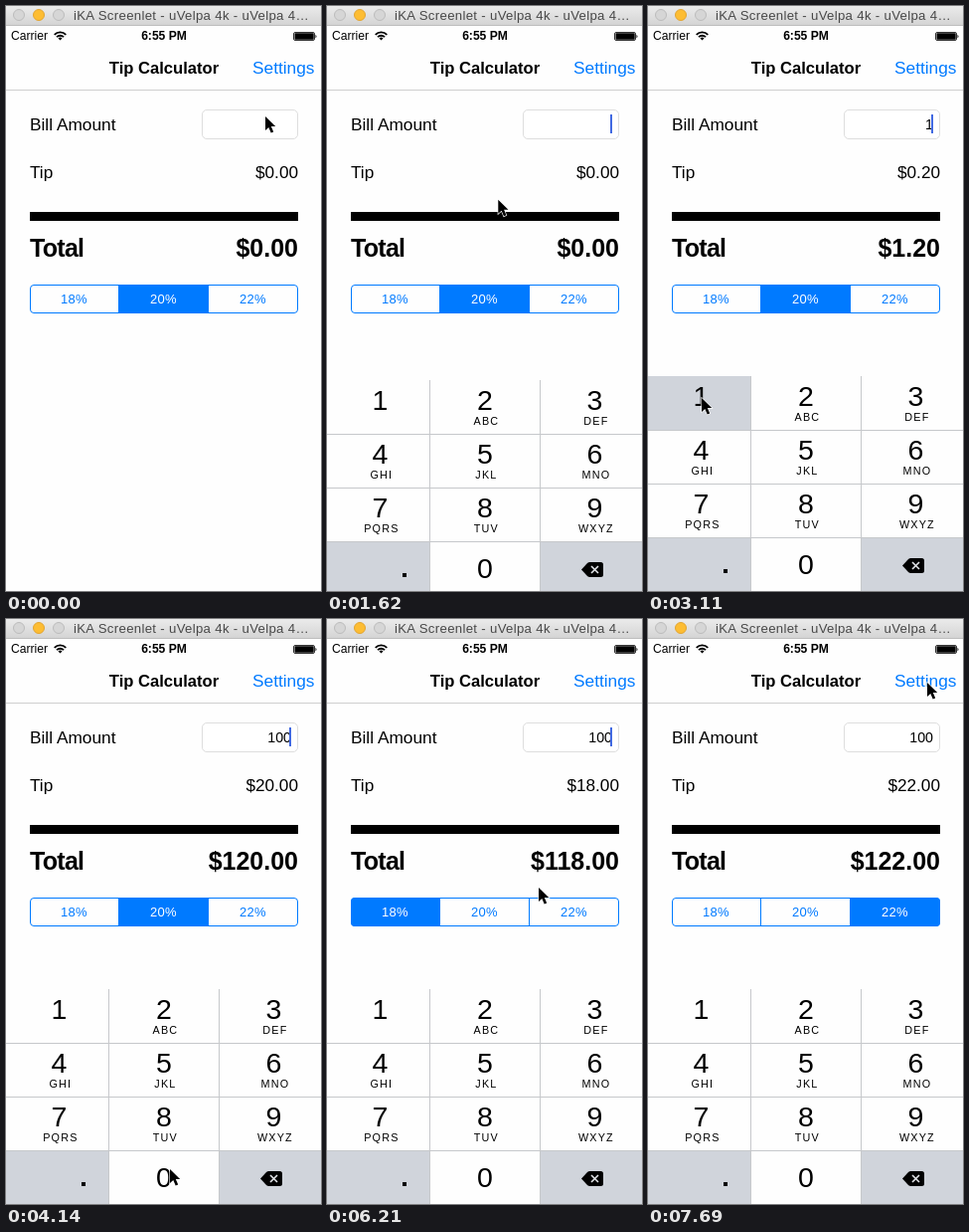
An HTML page that plays this animation: 317x588 px, repeating every 8000 ms.

```html
<!DOCTYPE html>
<html lang="en">
<head>
<meta charset="utf-8">
<title>Tip Calculator</title>
<style>
html, body { margin: 0; width: 100%; height: 100%; overflow: hidden; background: #fefefe; }
svg { display: block; font-family: "Liberation Sans", Arial, sans-serif; }
text { white-space: pre; }
.b { font-weight: 700; }
.m { text-anchor: middle; }
.e { text-anchor: end; }
.blue { fill: #007aff; }
.line { fill: #c6c8cb; }
.grey { fill: #d0d4db; }
</style>
</head>
<body>
<svg id="stage" width="317" height="588" viewBox="0 0 317 588">
  <defs>
    <linearGradient id="chrome" x2="0" y2="1">
      <stop stop-color="#ebebeb"/><stop offset="1" stop-color="#d3d3d3"/>
    </linearGradient>
    <clipPath id="pill"><rect x="24" y="280" width="270" height="29" rx="4"/></clipPath>
  </defs>
  <rect width="317" height="588" fill="#fefefe"/>

  <!-- window bar -->
  <rect width="317" height="20" fill="url(#chrome)"/>
  <rect y="19" width="317" height="1" fill="#bdbdbd"/>
  <g stroke-width="1">
    <circle cx="13" cy="9" r="5.5" fill="#d6d6d6" stroke="#bcbcbc"/>
    <circle cx="33" cy="9" r="5.5" fill="#fdbd33" stroke="#e2a532"/>
    <circle cx="53" cy="9" r="5.5" fill="#d6d6d6" stroke="#bcbcbc"/>
  </g>
  <text x="68" y="14" font-size="13.2" letter-spacing=".32" fill="#484848">iKA Screenlet - uVelpa 4k - uVelpa 4…</text>

  <!-- status bar -->
  <text x="5" y="34" font-size="12.1">Carrier</text>
  <g fill="none" stroke="#000" stroke-width="1.8">
    <path d="M48.7 28.9a8 8 0 0 1 11.6 0M51 31.2a4.9 4.9 0 0 1 7 0"/>
  </g>
  <path d="M54.5 34.6l-2-2.1a2.8 2.8 0 0 1 4 0z"/>
  <text x="159" y="34" font-size="12.1" class="b m">6:55 PM</text>
  <rect x="289.5" y="26.5" width="21" height="8" rx="1.5" fill="none" stroke="#000" stroke-width=".8"/>
  <rect x="290.5" y="27.3" width="19.2" height="6.4" rx=".6"/>
  <path d="M311.5 28.7q2 1.8 0 3.6z"/>

  <!-- navigation -->
  <text x="159" y="68" font-size="16.6" class="b m">Tip Calculator</text>
  <text x="248" y="68" font-size="17.3" class="blue">Settings</text>
  <rect y="84" width="317" height="1" fill="#cfcfcf"/>

  <!-- form -->
  <text x="24" y="125" font-size="17.3">Bill Amount</text>
  <rect x="197.5" y="104.5" width="96" height="29" rx="4.5" fill="#fff" stroke="#dedede"/>
  <text id="bill" x="287" y="124" font-size="14.2" class="e"></text>
  <rect id="caret" x="285" y="109" width="2" height="19" fill="#4169e1"/>
  <text x="24" y="173" font-size="17.2">Tip</text>
  <text id="tip" x="294" y="173" font-size="17.2" class="e"></text>
  <rect x="24" y="207" width="270" height="9"/>
  <text x="24" y="252" font-size="25" letter-spacing="-.7" class="b">Total</text>
  <text id="total" x="294" y="252" font-size="25" class="b e"></text>

  <g id="segments">
    <rect id="picked" y="280" width="90" height="29" class="blue" clip-path="url(#pill)"/>
    <rect x="24.5" y="280.5" width="269" height="28" rx="3.5" fill="none" stroke="#007aff"/>
    <path d="M113.5 280V309M203.5 280V309" stroke="#007aff"/>
  </g>
  <g id="keys"></g>
  <path id="cursor" d="M0 0V14L3.3 11L5.7 16.6L8.2 15.5L5.8 10.1H10.2Z" stroke="#fff" stroke-width="1.2" paint-order="stroke"/>
</svg>
<script>
const LOOP = 8000, STEP = 148, LEAD = 8;
const $ = id => document.getElementById(id);
const add = (parent, tag, attrs, text = "") => {
  const el = document.createElementNS("http://www.w3.org/2000/svg", tag);
  for (const k in attrs) el.setAttribute(k, attrs[k]);
  el.textContent = text;
  return parent.appendChild(el);
};
const rect = (x, y, width, height, cls) => add($("keys"), "rect", { x, y, width, height, class: cls });

// Keypad
const COLS = [0, 104, 215, 317], MIDS = [53.5, 159, 269.5], TOP = 372, ROW = 54;
const LETTERS = ["", "ABC", "DEF", "GHI", "JKL", "MNO", "PQRS", "TUV", "WXYZ"];
const digit = (x, y, s) => add($("keys"), "text", { x, y, class: "m", "font-size": 28.5 }, s);

rect(0, TOP, 317, 216, "").setAttribute("fill", "#fefefe");
rect(0, 535, 103, 53, "grey");
rect(215, 535, 102, 53, "grey");
const pressedOne = rect(0, TOP, 103, ROW, "grey");
const pressedZero = rect(104, 535, 110, 53, "grey");
for (const x of COLS.slice(1, 3)) rect(x - 1, TOP, 1, 216, "line");
for (let r = 1; r < 4; r++) rect(0, TOP + ROW * r, 317, 1, "line");
LETTERS.forEach((s, i) => {
  const x = MIDS[i % 3], y = TOP + ROW * Math.floor(i / 3);
  digit(x, y + 30, i + 1);
  add($("keys"), "text", { x: x + 1.4, y: y + 45, class: "m", "font-size": 10.8, "letter-spacing": 1.2 }, s);
});
digit(159, 571, 0);
rect(76, 566, 4, 4, "");
add($("keys"), "path", { d: "M256 562.5L262 556Q263 555 264.500 555H275.500Q278 555 278 557.500V567.500Q278 570 275.500 570H264.500Q263 570 262 569Z" });
add($("keys"), "path", { d: "M266 559L273 566M273 559L266 566", stroke: "#e2e4e8", "stroke-width": 1.6 });

const RATES = [18, 20, 22];
const labels = RATES.map((r, i) => add($("segments"), "text",
  { x: 68.5 + 90 * i, y: 299, class: "m", "font-size": 13, "letter-spacing": .3 }, r + "%"));

// Pointer waypoints: step, x, y
const PATH = [
  [0, 261, 111], [1, 260, 131], [2, 260, 131], [3, 264, 130], [7, 240, 116], [9, 240, 116],
  [14, 44, 344], [16, 44, 372], [19, 54, 394], [22, 54, 394], [24, 165, 553], [29, 165, 553],
  [36, 73, 294], [38, 73, 294], [42, 213, 270], [44, 247, 289], [46, 247, 289],
  [49, 249, 220], [50, 249, 220], [51, 272, 130], [52, 281, 64], [55, 281, 64]
];
// Value changes: from step, value
const BILL = [[0, 0], [21, 1], [25, 10], [28, 100]];
const RATE = [[0, 20], [38, 18], [45, 22]];
const SLIDE = [[0, 216], [9, 172], [10, 34], [11, 4], [12, 0]];
const BLINK = [[0, -1], [9, 9], [21, 21], [25, 25], [28, 28]];

const held = (table, n) => table.filter(row => row[0] <= n).pop()[1];
const within = (n, a, b) => n >= a && n < b;
const show = (el, on) => el.setAttribute("visibility", on ? "visible" : "hidden");

function pointer(n) {
  const i = PATH.findIndex(p => p[0] > n), [a, x, y] = PATH[i - 1], [b, u, v] = PATH[i];
  const k = (1 - Math.cos(Math.PI * (n - a) / (b - a))) / 2;
  return [x + (u - x) * k, y + (v - y) * k];
}

function draw(t) {
  const n = Math.floor((t + LEAD) / STEP);
  const bill = held(BILL, n), rate = held(RATE, n), reset = held(BLINK, n);
  const tip = bill * rate / 100;
  $("bill").textContent = bill || "";
  $("tip").textContent = "$" + tip.toFixed(2);
  $("total").textContent = "$" + (bill + tip).toFixed(2);
  show($("caret"), reset >= 0 && (n - reset) * STEP % 1000 < 500);

  const pick = RATES.indexOf(rate);
  $("picked").setAttribute("x", 24 + 90 * pick);
  labels.forEach((el, i) => el.setAttribute("fill", i === pick ? "#fff" : "#007aff"));

  $("keys").setAttribute("transform", `translate(0 ${held(SLIDE, n)})`);
  show(pressedOne, within(n, 20, 22));
  show(pressedZero, within(n, 25, 28));
  $("cursor").setAttribute("transform", `translate(${pointer(n)})`);
}

const start = performance.now();
function tick() {
  draw((performance.now() - start) % LOOP);
  requestAnimationFrame(tick);
}
tick();
</script>
</body>
</html>
```
